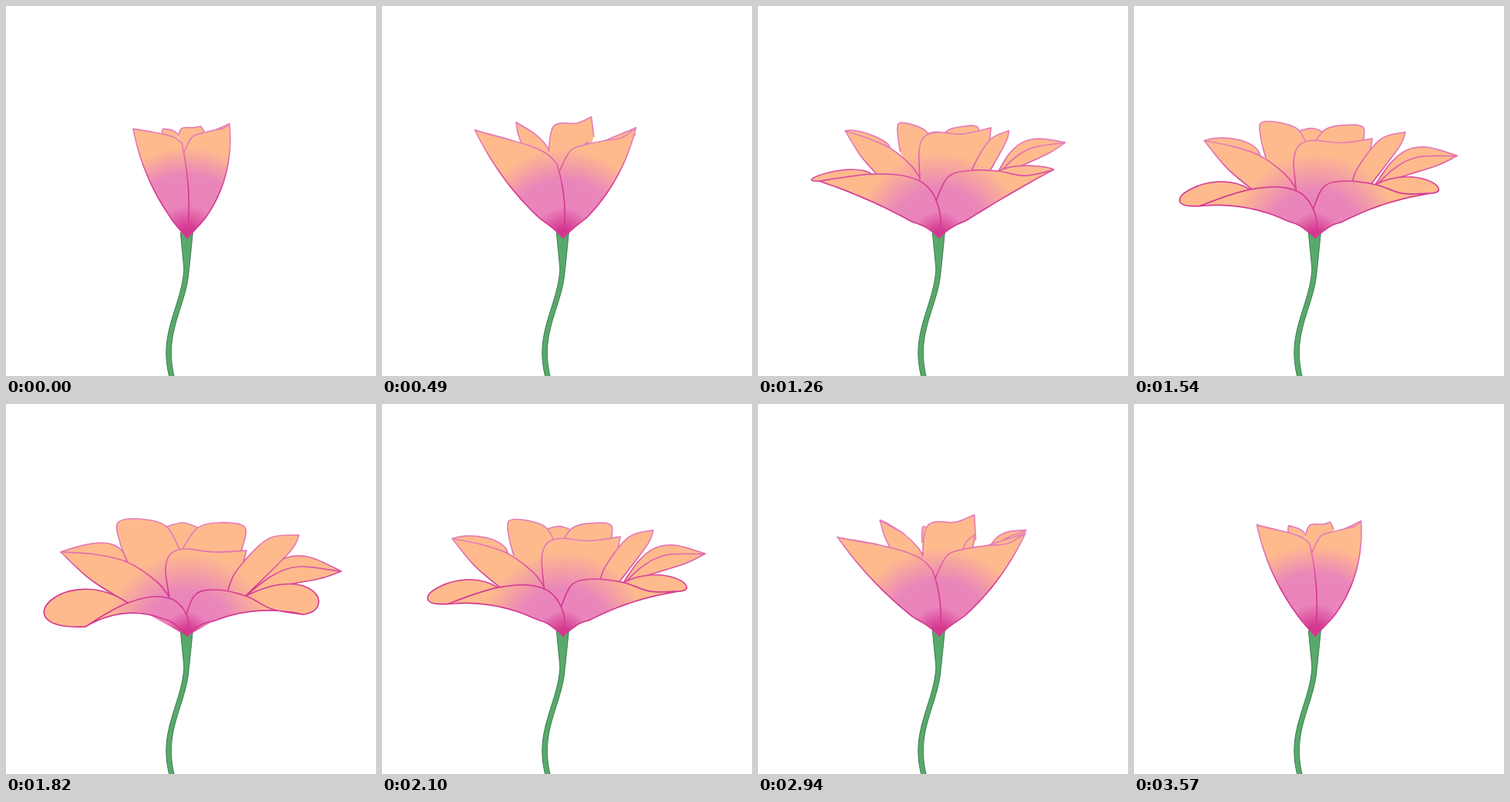
An HTML page with a canvas for the animation above (3.64 s loop, 480 by 480 pixels).

```html
<!DOCTYPE html>
<html lang="en">
<head>
<meta charset="utf-8">
<title>Blooming flower</title>
<style>
html, body { margin: 0; width: 100%; height: 100%; overflow: hidden; background: #fff; }
canvas { display: block; width: 480px; height: 480px; }
</style>
</head>
<body>
<canvas id="stage" width="480" height="480"></canvas>
<script>
const ctx = document.getElementById('stage').getContext('2d');
const STEP = 70, LOOP = 3640, PEAK = LOOP / 2;
const HEART = { x: 235, y: 301 };
const DEGREE = Math.PI / 180;

// Each petal is given fully open and swings about the heart of the flower.
//   fold:  share of the open angle that is left when closed
//   reach: length when closed; even: how unequal the lengths stay then
//   bulge: extra length halfway through the swing
const petals = {
  backMiddle: { fold: .1, reach: 120, even: .1, bulge: 0,
    open: [[205, 160], [230, 154], [252, 162]] },
  backRight: { fold: .1, reach: 125, even: .1, bulge: .05,
    open: [[228, 190], [248, 161], [276, 154], [310, 160], [304, 195]] },
  backLeft: { fold: -.1, reach: 129, even: .1, bulge: 0,
    open: [[158, 206], [148, 180], [145, 154], [172, 149], [207, 158], [226, 190]] },
  left: { fold: .22, reach: 145, even: .05, bulge: .05, corner: 2,
    open: [[158, 258], [110, 228], [71, 192], [115, 195], [157, 205], [195, 230], [213, 252]] },
  middle: { fold: .2, reach: 146, even: .1, bulge: .3, corner: 5,
    open: [[212, 252], [207, 215], [213, 195], [232, 188], [270, 192], [312, 190], [300, 235]] },
  right: { fold: .38, reach: 125, even: .2, bulge: .15, corner: 4,
    open: [[311, 249], [340, 215], [365, 199], [395, 199], [435, 217], [405, 227], [347, 237]] },
  rightFold: { fold: .38, reach: 125, even: .2, bulge: .15, lineOnly: true,
    open: [[432, 217], [380, 211], [345, 223], [311, 249]] },
  upright: { fold: .1, reach: 110, even: .2, bulge: 0, corner: 3,
    open: [[288, 241], [300, 215], [340, 175], [380, 170], [368, 192], [311, 249]] },
  frontRight: { fold: .256, reach: 158, even: .18, bulge: .2,
    side: 1, bow: { closed: 28, open: -25, power: 1.5 },
    open: [[385, 273], [345, 266], [311, 249], [272, 241], [245, 248], [231.5, 281]] },
  frontLeft: { fold: .31, reach: 158, even: .2, bulge: .5,
    side: -1, bow: { closed: 16, open: -42, power: 2.5 }, innerEdge: true,
    open: [[103, 289], [130, 272], [158, 258], [190, 250], [215, 253], [228, 263]] },

  // Curls roll out from the tip of their host to another point on its rim.
  leftFlap: { host: 'left', from: 2, to: 4, pull: [[39, -14], [-7, -35]] },
  rightCurl: { host: 'frontRight', from: 0, to: 2, pull: [[45, -5], [89, -44]] },
  leftCurl: { host: 'frontLeft', from: 0, to: 2, pull: [[-113, 5], [-80, -55]] }
};

const BACK_TO_FRONT = ['backMiddle', 'backRight', 'leftFlap', 'backLeft', 'left', 'middle',
  'right', 'rightFold', 'upright', 'rightCurl', 'leftCurl', 'frontRight', 'frontLeft'];

const lerp = (a, b, k) => a + (b - a) * k;
const clamp01 = v => Math.max(0, Math.min(1, v));
const toPolar = ([x, y]) => ({
  angle: Math.atan2(x - HEART.x, HEART.y - y),
  radius: Math.hypot(x - HEART.x, HEART.y - y)
});
const fromPolar = (angle, radius) =>
  [HEART.x + radius * Math.sin(angle), HEART.y - radius * Math.cos(angle)];

function swing({ open, fold, reach, even, bulge }, bloom) {
  const eased = bloom ** 1.15;
  const polar = open.map(toPolar);
  const longest = Math.max(...polar.map(p => p.radius));
  return polar.map(({ angle, radius }) => {
    const closed = reach * (radius / longest) ** even;
    const swell = bulge * (radius - 60) * 4 * bloom * (1 - bloom);
    return fromPolar(angle * lerp(fold, 1, eased), lerp(closed, radius, eased) + swell);
  });
}

// Catmull-Rom curve through the points, with an optional sharp corner.
function addCurve(path, points, corner) {
  const last = points.length - 1;
  points.slice(0, last).forEach((b, i) => {
    const c = points[i + 1];
    const a = i === 0 || i === corner ? b : points[i - 1];
    const d = i + 1 === last || i + 1 === corner ? c : points[i + 2];
    path.bezierCurveTo(
      b[0] + (c[0] - a[0]) / 6, b[1] + (c[1] - a[1]) / 6,
      c[0] - (d[0] - b[0]) / 6, c[1] - (d[1] - b[1]) / 6, ...c);
  });
}

// Outer edge of a front petal, from the heart to its tip.
function addOuterEdge(path, tip, { side, bow }, bloom) {
  const { angle, radius } = toPolar(tip);
  const bend = lerp(bow.closed, bow.open, bloom ** bow.power) * DEGREE;
  path.moveTo(HEART.x, HEART.y);
  for (let t = .04; t < 1; t += .04) {
    const r = t * radius;
    const a = lerp(side * 42 * DEGREE, angle + side * bend * (1 - t), clamp01(r / 40));
    path.lineTo(...fromPolar(a, r));
  }
  path.lineTo(...tip);
}

function curlPath({ from, to, pull }, rim, bloom) {
  const size = bloom ** 3;
  const control = (point, offset) => point.map((v, i) => v + offset[i] * size);
  const path = new Path2D();
  path.moveTo(...rim[from]);
  path.bezierCurveTo(...control(rim[from], pull[0]), ...control(rim[to], pull[1]), ...rim[to]);
  return path;
}

function petalPath(petal, points, bloom) {
  const path = new Path2D();
  if (petal.bow) addOuterEdge(path, points[0], petal, bloom);
  else path.moveTo(...points[0]);
  addCurve(path, points, petal.corner);
  if (petal.innerEdge) {
    const y = points[points.length - 1][1];
    path.quadraticCurveTo(242, (y + HEART.y) / 2, HEART.x, HEART.y);
  }
  return path;
}

function paint(path, body = path) {
  if (body) ctx.fill(body);
  ctx.stroke(path);
}

function drawPetal(name, bloom) {
  const petal = petals[name];
  if (petal.host) {
    const rim = swing(petals[petal.host], bloom);
    const path = curlPath(petal, rim, bloom);
    const body = new Path2D(path);
    body.lineTo(...rim[(petal.from + petal.to) / 2]);
    paint(path, body);
    return;
  }
  const path = petalPath(petal, swing(petal, bloom), bloom);
  const body = new Path2D(path);
  body.lineTo(HEART.x, HEART.y);
  paint(path, petal.lineOnly ? null : body);
}

function gradient(g, stops) {
  for (const [offset, color] of stops) g.addColorStop(offset, color);
  return g;
}

const lineColor = gradient(ctx.createLinearGradient(0, 180, 0, 240),
  [[0, '#e67fb8'], [1, '#d43a92']]);

function petalColor(bloom) {
  const radius = 120;
  return gradient(ctx.createRadialGradient(235, 301, 0, 235, 301, radius), [
    [0, '#d2328d'],
    [lerp(13, 9, bloom) / radius, '#d5388f'],
    [lerp(42, 32, bloom) / radius, '#ea83bb'],
    [lerp(82, 58, bloom) / radius, '#ea86ba'],
    [lerp(118, 108, bloom) / radius, '#feba8d']
  ]);
}

function makeStem() {
  const path = new Path2D();
  const edge = (y, side) => {
    const center = 223.7 + 11.6 * Math.cos(Math.PI * (Math.max(y, 335) - 335) / 115);
    const width = 6.5 + 9.5 * clamp01((342 - y) / 48);
    path.lineTo(center - 1 + side * width / 2, y);
  };
  for (let y = 294; y <= 484; y += 2) edge(y, -1);
  for (let y = 484; y >= 294; y -= 2) edge(y, 1);
  path.closePath();
  return path;
}

const stem = makeStem();

function draw(time) {
  const now = Math.floor((time % LOOP) / STEP) * STEP;
  const bloom = 1 - Math.abs(now - PEAK) / PEAK;

  ctx.fillStyle = '#fff';
  ctx.fillRect(0, 0, 480, 480);
  ctx.lineJoin = ctx.lineCap = 'round';

  ctx.fillStyle = '#58a96b';
  ctx.strokeStyle = '#3c7f52';
  ctx.lineWidth = 1;
  paint(stem);

  ctx.fillStyle = petalColor(bloom);
  ctx.strokeStyle = lineColor;
  ctx.lineWidth = 1.7;
  for (const name of BACK_TO_FRONT) drawPetal(name, bloom);
}

function tick(time) {
  draw(time);
  requestAnimationFrame(tick);
}
draw(0);
requestAnimationFrame(tick);
</script>
</body>
</html>
```
